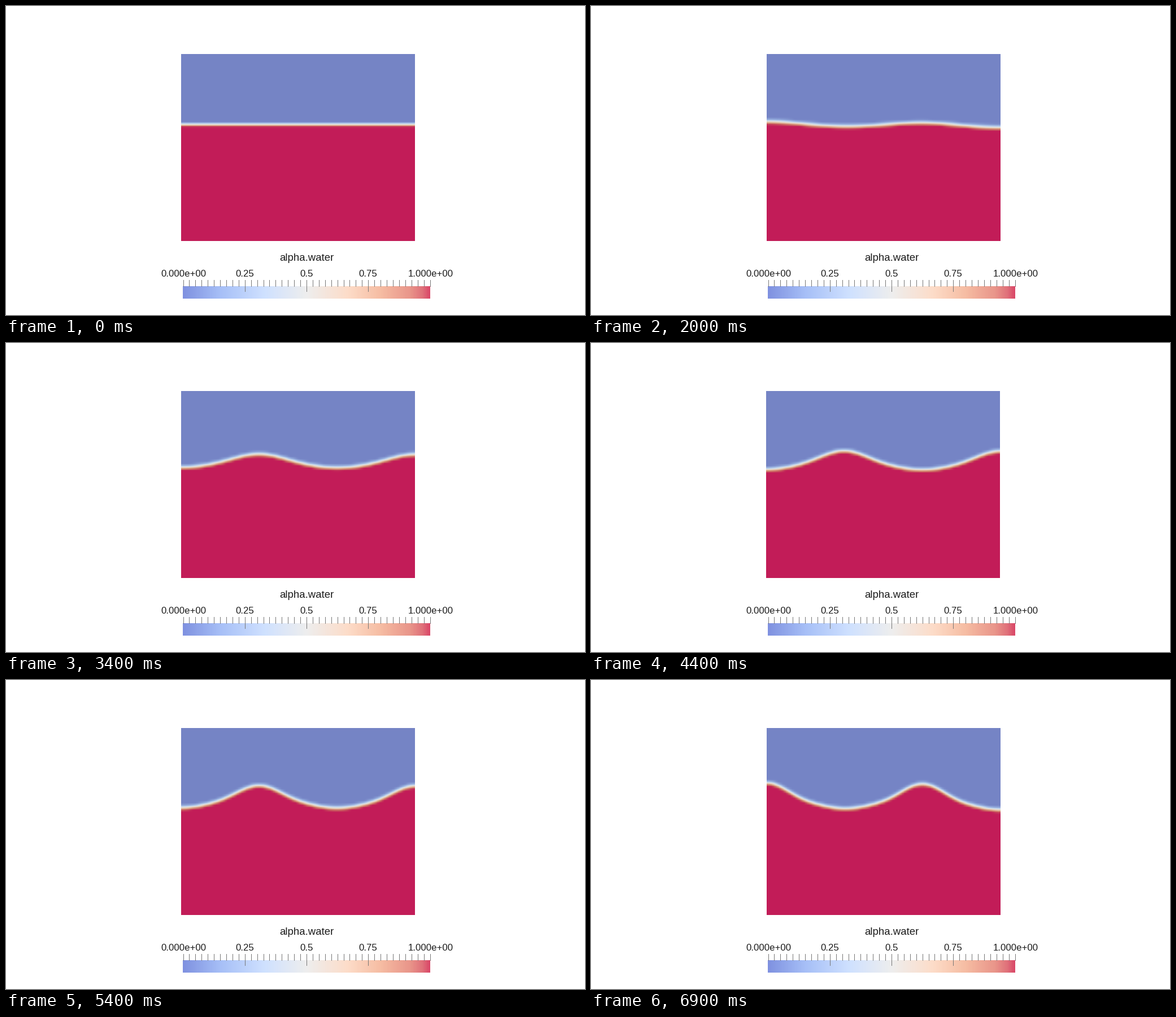
Write a matplotlib script that moves like this. It is 1025x547 px and loops after 7 s.

```python
import numpy as np
import matplotlib.pyplot as plt
from matplotlib.animation import FuncAnimation
from matplotlib.colors import LinearSegmentedColormap

W, H, DPI = 1025, 547, 100
FRAMES, INTERVAL = 70, 100

TANK_W, TANK_H, TOP = 414, 331, 85
COLS, ROWS = 100, 80
LEVEL = 124.4          # still water line, measured from the tank's top
INK = "#1c1c1c"

BAR_MAP = LinearSegmentedColormap.from_list("bar", [
    (0.0, "#7f91e0"), (0.15, "#a6bff7"), (0.33, "#cfe1ff"), (0.5, "#eeeeee"),
    (0.67, "#fddcc8"), (0.8, "#f6bda3"), (0.92, "#e9958a"), (0.97, "#e0717a"),
    (1.0, "#da4768")], N=512)
TANK_MAP = LinearSegmentedColormap.from_list("tank", [
    (0.0, "#7584c5"), (0.17, "#93abdd"), (0.35, "#bdd2ec"), (0.5, "#dfe0de"),
    (0.65, "#e6cbb5"), (0.8, "#d99a7c"), (0.92, "#c95a5e"), (1.0, "#c21c58")], N=512)


def lerp_weights(pixels, cells):
    """Matrix that interpolates cell corner values onto pixel centres."""
    pos = (np.arange(pixels) + 0.5) * cells / pixels
    return np.clip(1 - np.abs(pos[:, None] - np.arange(cells + 1)), 0, 1)


WEIGHT_Y = lerp_weights(TANK_H, ROWS)
WEIGHT_X = lerp_weights(TANK_W, COLS)
CELL_H = TANK_H / ROWS
cell_x = (np.arange(COLS) + 0.5) / COLS
cell_y = (np.arange(ROWS) + 0.5) * CELL_H


def tank_left(t):
    return round(310.5 + 1.2 * np.sin(2 * np.pi * (t + min(0.05 * t, 0.2))))


def surface(t):
    """Upward displacement: third sloshing mode, its harmonics and a small tilt."""
    keys = [0, 1, 2, 3.4, 4.4, 5.4, 6.9]
    size = np.interp(t, keys, [0, 3.8, 5, 11.7, 16, 18.8, 21.2])
    lead = np.interp(t, keys, [0, 0.06, 0.11, 0.12, 0.11, 0.1, 0.1])
    amp = size * np.cos(2 * np.pi * (t + lead))
    tilt = min(t, 1) * (0.9 + 0.5 * np.cos(2 * np.pi * (t + 0.08)))
    theta = 3 * np.pi * cell_x
    return (amp * np.cos(theta) + 0.009 * amp**2 * np.cos(2 * theta)
            + 0.00012 * amp**3 * np.cos(3 * theta) + tilt * np.cos(np.pi * cell_x))


def water(t):
    depth = cell_y[:, None] - (LEVEL - surface(t))
    blur = (1 + 0.8 * min(t, 1)) * CELL_H      # the sharp start smears out
    cells = np.pad(np.clip(depth / blur + 0.5, 0, 1), 1, mode="edge")
    corners = (cells[:-1, :-1] + cells[1:, :-1] + cells[:-1, 1:] + cells[1:, 1:]) / 4
    return WEIGHT_Y @ corners @ WEIGHT_X.T


fig = plt.figure(figsize=(W / DPI, H / DPI), dpi=DPI, facecolor="white")
ax = fig.add_axes([0, 0, 1, 1])
ax.axis("off")


def picture(data, left, top, width, height, cmap):
    return ax.imshow(data, cmap=cmap, vmin=0, vmax=1, aspect="auto",
                     interpolation="nearest",
                     extent=(left, left + width, top + height, top))


def label(x, baseline, text, px):
    ax.text(x, baseline, text, family="Liberation Sans", fontsize=px * 72 / DPI,
            color=INK, ha="center", va="baseline")


def ticks(xs, y0, y1):
    ax.vlines(xs, y0, y1, color="#777777", lw=0.72, antialiased=False)


tank = picture(water(0), tank_left(0), TOP, TANK_W, TANK_H, TANK_MAP)
picture(np.linspace(0, 1, 438)[None, :], 313, 496, 438, 22, BAR_MAP)
ticks(np.linspace(313.5, 750.5, 41), 485, 496)
ticks([422.75, 532, 641.25], 485, 505)
label(532, 451, "alpha.water", 18.6)
for x, text in [(314, "0.000e+00"), (422.5, "0.25"), (532, "0.5"),
                (641, "0.75"), (752, "1.000e+00")]:
    label(x, 479, text, 16.7)
ax.set_xlim(0, W)
ax.set_ylim(H, 0)


def update(frame):
    t = frame * INTERVAL / 1000
    left = tank_left(t)
    tank.set_data(np.clip(water(t), 0, 1))
    tank.set_extent((left, left + TANK_W, TOP + TANK_H, TOP))
    ax.set_xlim(0, W)
    ax.set_ylim(H, 0)
    return [tank]


anim = FuncAnimation(fig, update, frames=FRAMES, interval=INTERVAL,
                     repeat=True, repeat_delay=0)
plt.show()
```
